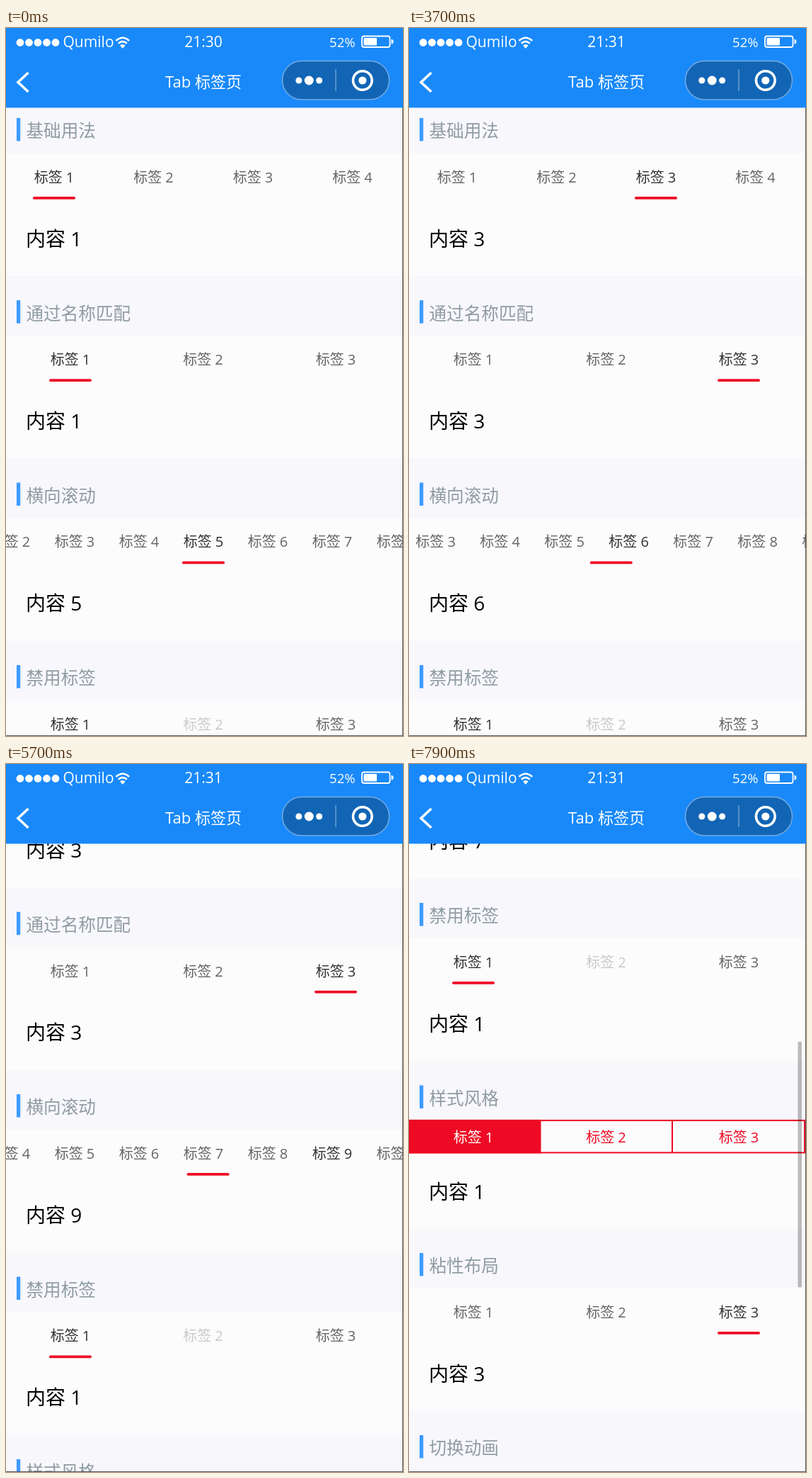
An HTML page for the animation above (8 s loop, 561x999 px).

```html
<!DOCTYPE html>
<html lang="zh-CN">
<head>
<meta charset="utf-8">
<title>Tab 标签页</title>
<style>
  html, body { margin: 0; width: 100%; height: 100%; overflow: hidden; background: #fcfcfc; }
  svg { display: block; width: 561px; height: 999px; }
  text { font-family: "Open Sans", "Noto Sans CJK SC", "Noto Sans CJK", sans-serif; white-space: pre; }
  .mid { text-anchor: middle; }
  .strip { fill: #f7f7fc; }
  .mark { fill: #3d9aff; }
  .heading { font-size: 24.6px; fill: #8f9ca2; }
  .tab { font-size: 20px; fill: #646566; }
  .tab.on { fill: #323233; }
  .tab.off { fill: #c8c9cc; }
  .red { fill: #ee0a24; }
  .white { fill: #fff; }
  .content { font-size: 28px; fill: #000; }
  .title { font-size: 22px; font-weight: 500; }
  .stroke { fill: none; stroke: #fff; }
</style>
</head>
<body>
<svg viewBox="0 0 561 999">
  <g id="page"></g>
  <rect id="scrollbar" x="549.5" width="5.5" height="346.5" rx="1" fill="#000" fill-opacity=".26"/>
  <path d="M560.5 112V999M0 998.5H561" stroke="#5a5a5c"/>

  <rect width="561" height="112.5" fill="#1989fa"/>
  <g id="signal" class="white"></g>
  <text class="white" x="80.5" y="27" font-size="21">Qumilo</text>
  <g class="stroke" stroke-width="2.6">
    <path d="M155.5 18Q164.800 9.500 174.100 18M158.800 21.800Q164.800 16.500 170.800 21.800"/>
  </g>
  <path class="white" d="M161 24.500Q164.800 21.500 168.600 24.500L164.800 29Z"/>
  <text id="clock" class="white mid" x="279" y="27" font-size="21"></text>
  <text class="white" x="457" y="27" font-size="18.600">52%</text>
  <rect class="stroke" x="503" y="11.500" width="39.500" height="15.500" rx="3" stroke-width="1.800"/>
  <rect class="white" x="505.500" y="14" width="18.500" height="10.500" rx="1"/>
  <path class="white" d="M544.500 16q3 0 3 3.300t-3 3.300z"/>

  <path class="stroke" d="M31.500 63L17 76.500L31.500 90" stroke-width="3.600"/>
  <text class="title white mid" x="279" y="84">Tab 标签页</text>
  <rect x="390.500" y="46.500" width="151" height="54.500" rx="27.200" fill="#1265b5" stroke="#75aae0" stroke-width="1.500"/>
  <path d="M466 58V89" stroke="#6c9fd2" stroke-width="1.500"/>
  <g class="white">
    <circle cx="413.800" cy="74" r="4.500"/>
    <circle cx="428.200" cy="74" r="6.500"/>
    <circle cx="442.600" cy="74" r="4.500"/>
    <circle cx="503.800" cy="74" r="5.600"/>
  </g>
  <circle class="stroke" cx="503.800" cy="74" r="13.300" stroke-width="3.600"/>
</svg>
<script>
const LOOP = 8000, STEP = 100;
const $ = id => document.getElementById(id);

function add(parent, name, attrs, label = "") {
  const node = document.createElementNS("http://www.w3.org/2000/svg", name);
  for (const key in attrs) node.setAttribute(key, attrs[key]);
  node.textContent = label;
  parent.append(node);
  return node;
}

// Text whose glyphs are centred vertically on cy.
const label = (parent, cls, x, cy, size, str) =>
  add(parent, "text", { class: cls, x, y: cy + size * 0.38 }, str);

const fourTabs = n => 68 + 140.5 * (n - 1);
const threeTabs = n => 91 + 187.5 * (n - 1);
const manyTabs = n => 91 * n + (n === 10 ? 5.5 : n === 11 ? 17 : 0);

const sections = [
  { name: "基础用法", y: 145, count: 4, place: fourTabs, start: 1 },
  { name: "通过名称匹配", y: 402.2, count: 3, place: threeTabs, start: 1 },
  { name: "横向滚动", y: 659.5, count: 11, place: manyTabs, start: 5, scrolls: true },
  { name: "禁用标签", y: 917, count: 3, place: threeTabs, start: 1, disabled: 2 },
  { name: "样式风格", y: 1174.4, card: true },
  { name: "粘性布局", y: 1411, count: 3, place: threeTabs, start: 3 },
  { name: "切换动画", y: 1668 }
];

// lead: how far into its 300 ms the slide is when it first shows.
const moves = [
  { section: 0, at: 800, to: 2, lead: 30 },
  { section: 0, at: 1300, to: 3, lead: 66 },
  { section: 1, at: 2200, to: 2, lead: 35 },
  { section: 1, at: 2800, to: 3, lead: 16 },
  { section: 2, at: 3600, to: 6, lead: 30 },
  { section: 2, at: 5100, to: 7, lead: 30 },
  { section: 2, at: 5700, to: 9, lead: 16 },
  { section: 2, at: 6700, to: 7, lead: 30 }
];

const pageScroll = [[0, 0], [4100, 13], [4200, 112], [4300, 175.5], [7700, 285.5], [7800, 520], [7900, 703]];
const barOpacity = [[0, 0], [4100, 1], [4600, 0.67], [4700, 0.33], [4800, 0], [7700, 1]];
const clockTimes = [[0, "21:30"], [3000, "21:31"]];
const valueAt = (table, t) => table.filter(([at]) => at <= t).pop()[1];

const mix = (a, b, p) => a + (b - a) * p;
const bezier = (s, a, b) => 3 * s * (1 - s) ** 2 * a + 3 * s * s * (1 - s) * b + s ** 3;

function ease(x) {
  if (x <= 0) return 0;
  if (x >= 1) return 1;
  let low = 0, high = 1;
  for (let i = 0; i < 20; i++) {
    const s = (low + high) / 2;
    if (bezier(s, 0.25, 0.25) < x) low = s; else high = s;
  }
  return bezier(low, 0.1, 1);
}

function buildCard(page, y) {
  add(page, "rect", { x: 1, y: y + 31.5, width: 558, height: 45.5, fill: "#fcfcfc", stroke: "#ee0a24", "stroke-width": 2 });
  add(page, "rect", { class: "red", x: 0, y: y + 30.5, width: 186.5, height: 47.5 });
  add(page, "rect", { class: "red", x: 371, y: y + 31, width: 2, height: 46 });
  for (let n = 1; n <= 3; n++) {
    label(page, "tab mid", threeTabs(n), y + 54.7, 20, "标签 " + n)
      .setAttribute("class", "tab mid " + (n === 1 ? "white" : "red"));
  }
  page.lastChild.parentNode.querySelectorAll(".tab.white, .tab.red").forEach(node =>
    node.style.fill = node.classList.contains("white") ? "#fff" : "#ee0a24");
  label(page, "content", 28, y + 131.5, 28, "内容 1");
}

function buildTabs(page, section) {
  const { y, count, place, disabled } = section;
  section.strip = add(page, "g", {});
  section.tabs = Array.from({ length: count }, (_, i) =>
    label(section.strip, "tab mid" + (disabled === i + 1 ? " off" : ""), place(i + 1), y + 65.3, 20, "标签 " + (i + 1)));
  section.line = add(section.strip, "rect", { class: "red", y: y + 93, width: 60, height: 3.8, rx: 1.9 });
  section.content = label(page, "content", 28, y + 152, 28, "");
}

for (const section of sections) {
  const { y, name, card, count } = section, page = $("page");
  add(page, "rect", { class: "strip", x: 0, y: y - 52, width: 561, height: 83.5 });
  add(page, "rect", { class: "mark", x: 15, y: y - 18, width: 5.2, height: 32.5 });
  label(page, "heading", 28.5, y, 24.6, name);
  if (card) buildCard(page, y);
  if (count) buildTabs(page, section);
}
for (let i = 0; i < 5; i++) add($("signal"), "circle", { cx: 20 + 12.5 * i, cy: 20.5, r: 5.4 });

// Centres the chosen tab; the ninth is held back by the end of the row.
const rowOffset = n => Math.max(279 - manyTabs(n), 296 - manyTabs(9));

function renderTabs(section, index, t) {
  let chosen = section.start;
  let lineX = section.place(chosen);
  let offset = section.scrolls ? rowOffset(chosen) : 0;
  for (const { at, to, lead } of moves.filter(m => m.section === index && m.at <= t)) {
    const elapsed = t - at + lead;
    lineX = mix(lineX, section.place(to), ease(elapsed / 300));
    if (section.scrolls) offset = mix(offset, rowOffset(to), ease((elapsed - 16) / 300));
    chosen = to;
  }
  section.tabs.forEach((tab, i) => tab.classList.toggle("on", i + 1 === chosen));
  section.line.setAttribute("x", lineX - 30);
  section.strip.setAttribute("transform", `translate(${offset} 0)`);
  section.content.textContent = "内容 " + chosen;
}

function render(now) {
  const t = Math.floor((now % LOOP) / STEP) * STEP;
  const scroll = valueAt(pageScroll, t);
  sections.forEach((section, i) => section.tabs && renderTabs(section, i, t));
  $("page").setAttribute("transform", `translate(0 ${-scroll})`);
  $("scrollbar").setAttribute("y", 117 + scroll * 0.391);
  $("scrollbar").setAttribute("opacity", valueAt(barOpacity, t));
  $("clock").textContent = valueAt(clockTimes, t);
}

const began = performance.now();
function frame() {
  render(performance.now() - began);
  requestAnimationFrame(frame);
}
frame();
</script>
</body>
</html>
```
